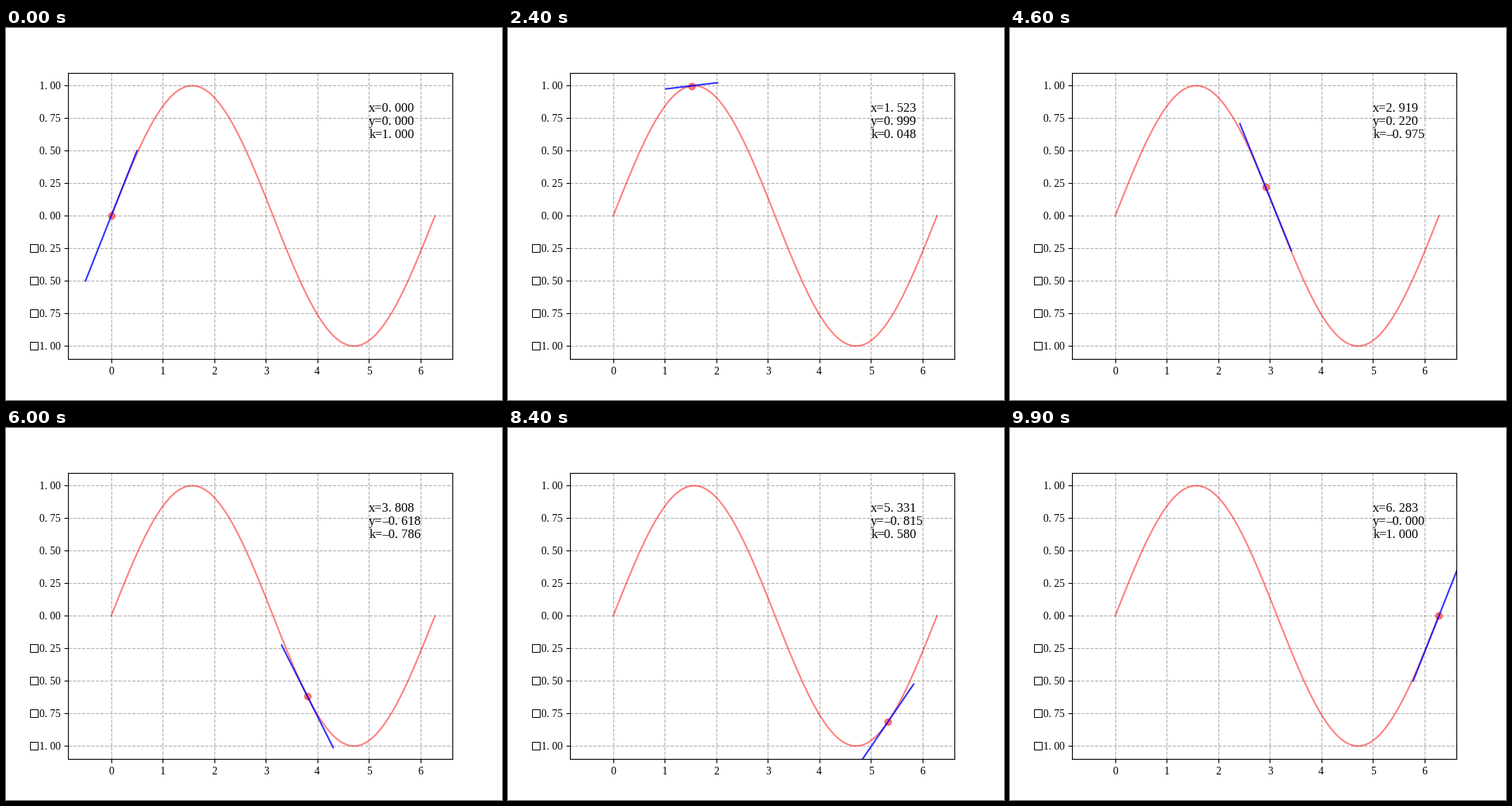
These frames come from a looping animation (640x480 px, 10 s). A matplotlib script:

```python
import numpy as np
import matplotlib.pyplot as plt
from matplotlib.animation import FuncAnimation
from matplotlib.transforms import blended_transform_factory

FRAMES = 100
HALF = 0.5  # half width of the tangent segment

plt.rcParams["font.family"] = "Liberation Serif"


def half_width(value, digits):
    """Format a number so that every character fills half an em."""
    return f"{value:.{digits}f}".replace(".", ". ").replace("-", "\u2013")


xs = np.linspace(0, 2 * np.pi, FRAMES)
ys = np.sin(xs)

fig, ax = plt.subplots(figsize=(6.4, 4.8), dpi=100)
ax.plot(xs, ys, color="red", alpha=0.5)
dot, = ax.plot([], [], "o", color="red", alpha=0.5)
tangent, = ax.plot([], [], color="blue", alpha=0.8)

margin = 0.05 * (xs[-1] + HALF)
ax.set_xlim(-HALF - margin, xs[-1] + margin)
ax.set_ylim(-1.1, 1.1)
ax.grid(linestyle="--")

ticks = np.linspace(-1, 1, 9)
ax.set_xticks(range(7))
ax.set_yticks(ticks, [half_width(abs(t), 2) for t in ticks])

# hollow boxes stand in for the minus signs of the tick labels
ax.plot([36 / 640] * 4, ticks[:4], "s", ms=7.9, mfc="none", mec="black",
        mew=0.72, clip_on=False,
        transform=blended_transform_factory(fig.transFigure, ax.transData))

readouts = []
for name, y in zip("xyk", (0.8, 0.7, 0.6)):
    ax.text(5, y, name + "=", fontsize=12)
    readouts.append(ax.annotate("", (5, y), xytext=(12, 0), fontsize=12,
                                textcoords="offset points"))


def update(i):
    x, y, k = xs[i], ys[i], np.cos(xs[i])
    dot.set_data([x], [y])
    tangent.set_data([x - HALF, x + HALF], [y - k * HALF, y + k * HALF])
    for label, value in zip(readouts, (x, y, k)):
        label.set_text(half_width(value, 3))
    return [dot, tangent, *readouts]


anim = FuncAnimation(fig, update, frames=FRAMES, interval=100,
                     repeat=True, repeat_delay=0, blit=False)
plt.show()
```
